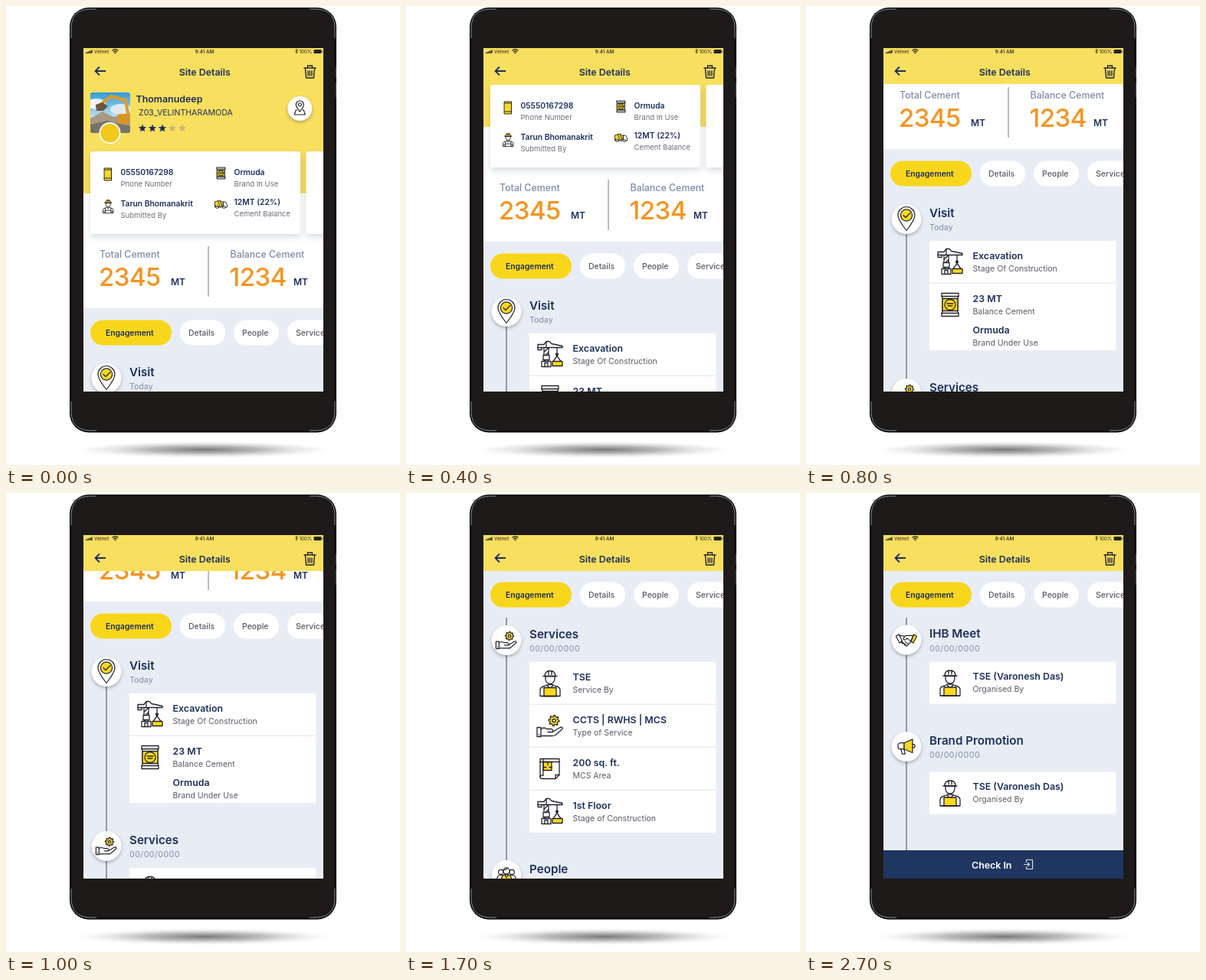
These frames come from a looping animation (514x600 px, 3.7 s). An HTML page:

```html
<!DOCTYPE html>
<html lang="en">
<head>
<meta charset="utf-8">
<title>Site details</title>
<style>
html, body { margin: 0; width: 100%; height: 100%; overflow: hidden; background: #fff; }
svg { display: block; width: 100%; height: 100%; }
text { font-family: Inter, Roboto, sans-serif; }
.card { fill: #fff; filter: drop-shadow(0 4px 4px rgba(60, 80, 120, .2)); }
.dot { fill: #fff; filter: drop-shadow(0 2px 2px rgba(40, 50, 70, .35)); }
.ico { fill: none; stroke: #23252b; stroke-width: 1.3; stroke-linejoin: round; stroke-linecap: round; }
.ico .y { fill: #fbd81f; }
.ico .w { fill: #fff; }
.ico .k { fill: #23252b; }
</style>
</head>
<body>
<svg id="stage" viewBox="0 0 514 600" xmlns="http://www.w3.org/2000/svg"></svg>
<script>
const NAVY = '#1d2f5c', GREY = '#575b63', MUTED = '#7d8ca8', YELLOW = '#f9df5e', PALE = '#e8edf5';
const LOOP = 3700, TAB_STOP = 294, BAR_TIME = 2700;

// [time, scroll offset]
const STEPS = [[0, 0], [200, 44], [400, 87], [600, 164], [800, 208], [1000, 253],
  [1200, TAB_STOP], [1700, 522], [2200, 829], [BAR_TIME, 1083]];

const text = (x, y, s, size, weight = 400, fill = GREY, extra = '') =>
  `<text x="${x}" y="${y}" font-size="${size}" font-weight="${weight}" fill="${fill}" ${extra}>${s}</text>`;
const rect = (x, y, w, h, fill, rx = 0, extra = '') =>
  `<rect x="${x}" y="${y}" width="${w}" height="${h}" rx="${rx}" fill="${fill}" ${extra}/>`;
const circle = (x, y, r, attrs) => `<circle cx="${x}" cy="${y}" r="${r}" ${attrs}/>`;
const path = (d, cls = '') => `<path d="${d}" class="${cls}"/>`;
const icon = (name, x, y, scale = 1, width = 1.3) =>
  `<g class="ico" style="stroke-width:${width / scale}" transform="translate(${x} ${y}) scale(${scale})">${ICONS[name]}</g>`;

function ring(n, radius) {
  return Array.from({ length: n }, (_, i) => {
    const a = i / n * Math.PI * 2 - Math.PI / 2, r = radius(i);
    return (r * Math.cos(a)).toFixed(2) + ',' + (r * Math.sin(a)).toFixed(2);
  }).join(' ');
}
const star = (x, fill) =>
  `<polygon points="${ring(10, i => i % 2 ? 2.4 : 5.4)}" transform="translate(${x} 160)" fill="${fill}"/>`;

const gear = `<g transform="translate(5 -7)"><polygon class="y" points="${ring(32, i => i % 4 < 2 ? 7 : 5.2)}"/>${circle(0, 0, 2, 'class="w"')}</g>`;
const dome = cls => path('M-7-9Q-7-16 0-16T7-9Z', cls) + path('M-9-9H9M-2-16V-11M2-16V-11');
const face = path('M-6-9V-5Q-5 1 0 1T6-5V-9');
const mate = (x, y) => circle(x, y, 4, 'class="w"') + path(`M${x - 6} ${y + 13}V${y + 9}Q${x - 5} ${y + 5} ${x} ${y + 5}T${x + 6} ${y + 9}V${y + 13}Z`, 'w');

const ICONS = {
  crane: path('M-16-10V-13H-8L-5-17H-1L2-14L16-11V-9H-16Z', 'w') + path('M-16-9V-6H-11V-9M-8-9V10M-2-9V10M-8-3L-2-9M-8 3L-2-3M-8 9L-2 3M-5-17V-9')
    + path('M-9 1H-1V7H-9ZM-11 9H1V16H-11ZM-7 16V11H-3V16', 'w') + path('M9-9V1M9 2L4 9M9 2L14 9') + circle(9, 0, 1.4, 'class="k"') + path('M3 9H16V15H3Z', 'y'),
  bag: path('M-11-15H11V-11L10-9V9L11 11V15H-11V11L-10 9V-9L-11-11Z', 'w') + path('M-10-8H10V8H-10Z', 'y')
    + path('M-11-11H11M-11 11H11') + circle(0, 0, 7, 'class="y"') + path('M-4-1.5H4M-3 1.5H3'),
  worker: path('M-13 17V9Q-13 5-7 4L-3 2H3L7 4Q13 5 13 9V17Z', 'w') + dome('w') + face + path('M-4 3L0 7L4 3') + path('M-8 6H8V17H-8Z', 'y') + path('M-11 17H11'),
  contractor: path('M-13 16V9Q-13 5-7 4L-3 2H3L7 4Q13 5 13 9V16Z', 'w') + path('M-7 4V16M7 4V16M-7 10H7M-3 3L0 6L3 3M-10 11V16M10 11V16') + dome('y') + face,
  service: gear + path('M-17 2H-12V14H-17Z', 'w') + path('M-12 4Q-8 1-4 4H2Q5 5 3 8H-3M3 8L13 2Q17 1 16 4L7 12Q5 13 2 13H-12') + path('M-14.5 11V11.5'),
  plan: path('M-13-13H12V8L7 13H-10Q-13 13-13 10Z', 'w') + path('M-9-9H2V2H-9Z', 'y') + path('M-13-9H12M-9-13V9Q-13 7-13 11M7 13V8H12M-3-9V-5M-9-2H-5M2-2H-1'),
  people: mate(-9, -5) + mate(9, -5) + circle(0, -7, 5, 'class="w"') + path('M-8 11V5Q-7-1 0-1T8 5V11Z', 'y') + path('M-3-1L0 4L3-1M-5-8Q0-9 2-11') + path('M-14 11H14'),
  shake: path('M-17-6L-12-9L-7 2L-11 5Z', 'w') + path('M17-6L12-9L7 2L11 5Z', 'y')
    + path('M-11-7L-3-6L0-7L11-7L8 2L2 9Q0 11-2 9L-8 2M-3-6L-5-1Q-2 2 1-3L8 3M-5 5L-1 8M-2 3L3 7M-8 2Q-9 6-5 6'),
  horn: path('M-4-6L10-12V10L-4 4Z', 'y') + path('M-4-6H-11Q-14-5-14-1T-11 4H-4Z', 'w') + path('M-9 4L-7 12H-2L-4 4M10-4Q14-4 14-1T10 2'),
  check: path('M0 15Q-11 1-11-5A11 11 0 0 1 11-5Q11 1 0 15Z', 'w') + circle(0, -5, 7.6, 'class="y"') + path('M-4-5L-1-2L5-8'),
  phone: path('M-4.5-8H4.5V8H-4.5Z', 'y') + path('M-4.5-6H4.5M-4.5 5H4.5'),
  truck: path('M-8-3L-2-5L3-2L2 3H-7Z', 'y') + path('M3-3H6L8 1V4H-8V1M3-3V4M-4-4L-2 2M-1-4L1 2') + circle(-5, 4, 1.6, 'class="w"') + circle(4, 4, 1.6, 'class="w"'),
  pin: path('M0 4Q-5-2-5-5A5 5 0 0 1 5-5Q5-2 0 4Z', 'w') + circle(0, -5, 2, '') + path('M-4 2H-5L-7 8H7L5 2H4'),
  trash: path('M-6-4L-5 8H5L6-4M-7.5-5H7.5M-3-5V-8H3V-5M-2.5-1V5M0-1V5M2.5-1V5'),
  enter: path('M-3-3V-6H5V6H-3V3M-6 0H1M-1-2L1 0L-1 2')
};

function device() {
  const corner = flip => `<path transform="translate(257 279.5) scale(${flip}) translate(-257 -279.5)" d="M85 42V28Q86 5 109 4H118" fill="none" stroke="#9fb0ba" stroke-width="1" opacity=".8"/>`;
  return `<ellipse cx="258" cy="580" rx="167" ry="11" fill="url(#shade)"/>`
    + rect(83, 2, 348, 555.5, '#0b0b0c', 25) + rect(85.5, 4.5, 343, 550.5, '#1e1a19', 23)
    + ['1 1', '-1 1', '1 -1', '-1 -1'].map(corner).join('')
    + rect(429.5, 80, 1.5, 14, '#454545') + rect(429.5, 100, 1.5, 20, '#454545');
}

function photo() {
  return `<g clip-path="url(#photo)">` + rect(110, 113, 52, 53, 'url(#sky)')
    + `<ellipse cx="118" cy="128" rx="12" ry="7" fill="#eef5fa"/><ellipse cx="150" cy="135" rx="14" ry="7" fill="#dfeaf2"/>`
    + `<path d="M110 147L126 138L140 145L162 140V166H110Z" fill="#a89884"/><path d="M110 155L132 150L162 157V166H110Z" fill="#77736c"/>`
    + `<path d="M119 132L137 118L156 123L160 146" fill="none" stroke="#e39a22" stroke-width="4"/>`
    + `<path d="M117 129L126 126L133 131L127 137H118Z" fill="#6d553e"/>` + rect(146, 141, 15, 13, '#d99423', 2) + `</g>`;
}

function summary() {
  const pair = (x, y, a, b) => text(x, y, a, 10.3, 600, NAVY) + text(x, y + 15, b, 9.5, 400, '#6b6f77');
  const total = (x, unitX, label, n) => text(x, 329, label, 12.4, 500, MUTED)
    + text(x - 1, 366, n, 33, 500, '#f7931e', 'letter-spacing="-.5"') + text(unitX, 365, 'MT', 12, 600, NAVY);
  return rect(101, 55, 313, 190, YELLOW) + rect(101, 245, 313, 150, '#fff')
    + photo() + circle(135.5, 166, 14, 'fill="#fff"') + circle(135.5, 166, 12.3, 'fill="#f2c81d"')
    + text(169.5, 125.5, 'Thomanudeep', 12.4, 600, NAVY) + text(173, 143, 'Z03_VELINTHARAMODA', 10.6, 400, NAVY)
    + [178, 191, 204, 217, 230].map((x, i) => star(x, i < 3 ? NAVY : '#c9b877')).join('')
    + circle(383.3, 134, 16, 'class="dot"') + icon('pin', 383.3, 134, 1, 1.2)
    + `<rect x="110" y="190" width="274" height="108" rx="3" class="card"/><rect x="391.500" y="190" width="274" height="108" rx="3" class="card"/>`
    + pair(149.5, 220.5, '05550167298', 'Phone Number') + pair(149.5, 262, 'Tarun Bhomanakrit', 'Submitted By')
    + pair(297.5, 220.5, 'Ormuda', 'Brand In Use') + pair(297.5, 260, '12MT (22%)', 'Cement Balance')
    + icon('phone', 133, 220, 1, 1) + icon('bag', 280.5, 218.5, .5, 1) + icon('contractor', 133.3, 262, .52, .9) + icon('truck', 280.5, 259, 1, .9)
    + total(122, 215, 'Total Cement', '2345') + rect(263.4, 314, 1.3, 66, '#8c9bb0') + total(292.5, 375, 'Balance Cement', '1234');
}

// A row is an icon followed by [title, caption] pairs.
function section(y, mark, title, date, rows, gap = 31.5) {
  const top = y + gap;
  let body = '', rowY = top;
  rows.forEach(([name, ...pairs], i) => {
    if (i) body += rect(161, rowY - 1.5, 243.5, 1.5, PALE);
    body += icon(name, 188, rowY + 27.5);
    pairs.forEach(([a, b], k) => {
      body += text(217.5, rowY + 23.5 + 41 * k, a, 12.4, 600, NAVY) + text(217.5, rowY + 39.5 + 41 * k, b, 10.5);
    });
    rowY += pairs.length > 1 ? 46 + 41 * (pairs.length - 1) : 56;
  });
  const end = rows[rows.length - 1].length > 2 ? rowY : rowY - 1;
  return circle(131, y + 3, 19.5, 'class="dot"') + icon(mark, 131, y + 3, mark === 'check' ? 1 : .8, 1.2)
    + text(161, y, title, 15.2, 600, NAVY)
    + text(161, y + 17.5, date, 10.6, 400, MUTED, date[0] === '0' ? 'letter-spacing=".5"' : '')
    + rect(161, top, 243.5, end - top, '#fff', 2) + body;
}

function timeline() {
  const person = 'Varonesh Das', none = '00/00/0000';
  const host = ['worker', [`TSE (${person})`, 'Organised By']];
  return rect(130.2, 486, 1.6, 1200, '#7588a3')
    + section(483.5, 'check', 'Visit', 'Today', [
      ['crane', ['Excavation', 'Stage Of Construction']],
      ['bag', ['23 MT', 'Balance Cement'], ['Ormuda', 'Brand Under Use']]])
    + section(711.5, 'service', 'Services', none, [
      ['worker', ['TSE', 'Service By']], ['service', ['CCTS | RWHS | MCS', 'Type of Service']],
      ['plan', ['200 sq. ft.', 'MCS Area']], ['crane', ['1st Floor', 'Stage of Construction']]])
    + section(1018.5, 'people', 'People', none, [
      ['contractor', ...['Contractor', 'Dealer', 'Contractor', 'Contractor'].map(job => [person, job])]])
    + section(1272, 'shake', 'IHB Meet', none, [host])
    + section(1411.5, 'horn', 'Brand Promotion', none, [host], 36);
}

function tabs() {
  const tab = (x, w, tx, s) => rect(x, 410.5, w, 33, '#fff', 16.5) + text(tx, 431, s, 10.5, 500);
  return rect(101, 396, 313, 61, PALE) + rect(110, 410.5, 106, 33, '#f8d61c', 16.5)
    + text(130, 431, 'Engagement', 10.3, 600, NAVY)
    + tab(227, 59, 238, 'Details') + tab(297, 59, 308, 'People') + tab(367, 70, 378, 'Services');
}

function header() {
  const bars = [0, 1, 2, 3].map(i => rect(104 + i * 2.3, 60.5 - i, 1.7, 1.5 + i, '#222', .4)).join('');
  return rect(101, 55, 313, 47, YELLOW) + bars
    + text(115, 62, 'Velnet', 6.5, 400, '#222') + text(259, 62, '9:41 AM', 6.5, 500, '#222', 'text-anchor="middle"')
    + text(382.5, 62, '100%', 6.3, 400, '#222')
    + `<g fill="none" stroke="#222"><path d="M138.500 58.500Q142.500 54.800 146.500 58.500M140.300 60.200Q142.500 58.200 144.700 60.200" stroke-width="1.2"/><path d="M377.500 57.500L380.500 60.200L379 61.800V56.200L380.500 57.800L377.500 60.500" stroke-width=".7"/></g>`
    + circle(142.5, 61.4, .9, 'fill="#222"') + rect(401.5, 57, 10, 5, '#222', 1) + rect(412, 58.5, .9, 2, '#222')
    + `<path d="M130 85H116.500M122 79.500L116.500 85L122 90.500" fill="none" stroke="${NAVY}" stroke-width="1.800"/>`
    + text(259.3, 90.5, 'Site Details', 12.4, 600, NAVY, 'text-anchor="middle"')
    + `<g style="--c:${NAVY}">` + icon('trash', 396.5, 86, 1, 1.4) + '</g>';
}

const stage = document.getElementById('stage');
stage.innerHTML = `<defs>
  <clipPath id="screen">${rect(101, 55, 313, 449, '#000')}</clipPath>
  <clipPath id="photo">${rect(110, 113, 52, 53, '#000', 3)}</clipPath>
  <linearGradient id="sky" x2="0" y2="1"><stop stop-color="#2f9bd6"/><stop offset=".6" stop-color="#b9dff2"/></linearGradient>
  <radialGradient id="shade"><stop stop-color="#777"/><stop offset=".45" stop-color="#aaa" stop-opacity=".8"/><stop offset="1" stop-color="#ddd" stop-opacity="0"/></radialGradient>
</defs>` + device()
  + `<g clip-path="url(#screen)">${rect(101, 55, 313, 449, PALE)}`
  + `<g id="page">${summary()}${timeline()}</g><g id="tabs">${tabs()}</g>${header()}`
  + `<g id="bar">${rect(101, 467, 313, 37, '#1f3661')}${text(216, 490.5, 'Check In', 12.4, 600, '#fff')}`
  + `<g style="filter:invert(1)">${icon('enter', 290.5, 485.5, 1, 1.2)}</g></g></g>`;

const page = document.getElementById('page'), tabRow = document.getElementById('tabs'), bar = document.getElementById('bar');

function draw(now) {
  const t = now % LOOP;
  const scroll = STEPS.filter(([start]) => start <= t).pop()[1];
  page.setAttribute('transform', `translate(0 ${-scroll})`);
  tabRow.setAttribute('transform', `translate(0 ${-Math.min(scroll, TAB_STOP)})`);
  bar.setAttribute('visibility', t >= BAR_TIME ? 'visible' : 'hidden');
}

let begin;
function tick(now) {
  begin ??= now;
  draw(Math.max(0, now - begin));
  requestAnimationFrame(tick);
}
draw(0);
requestAnimationFrame(tick);
</script>
</body>
</html>
```
